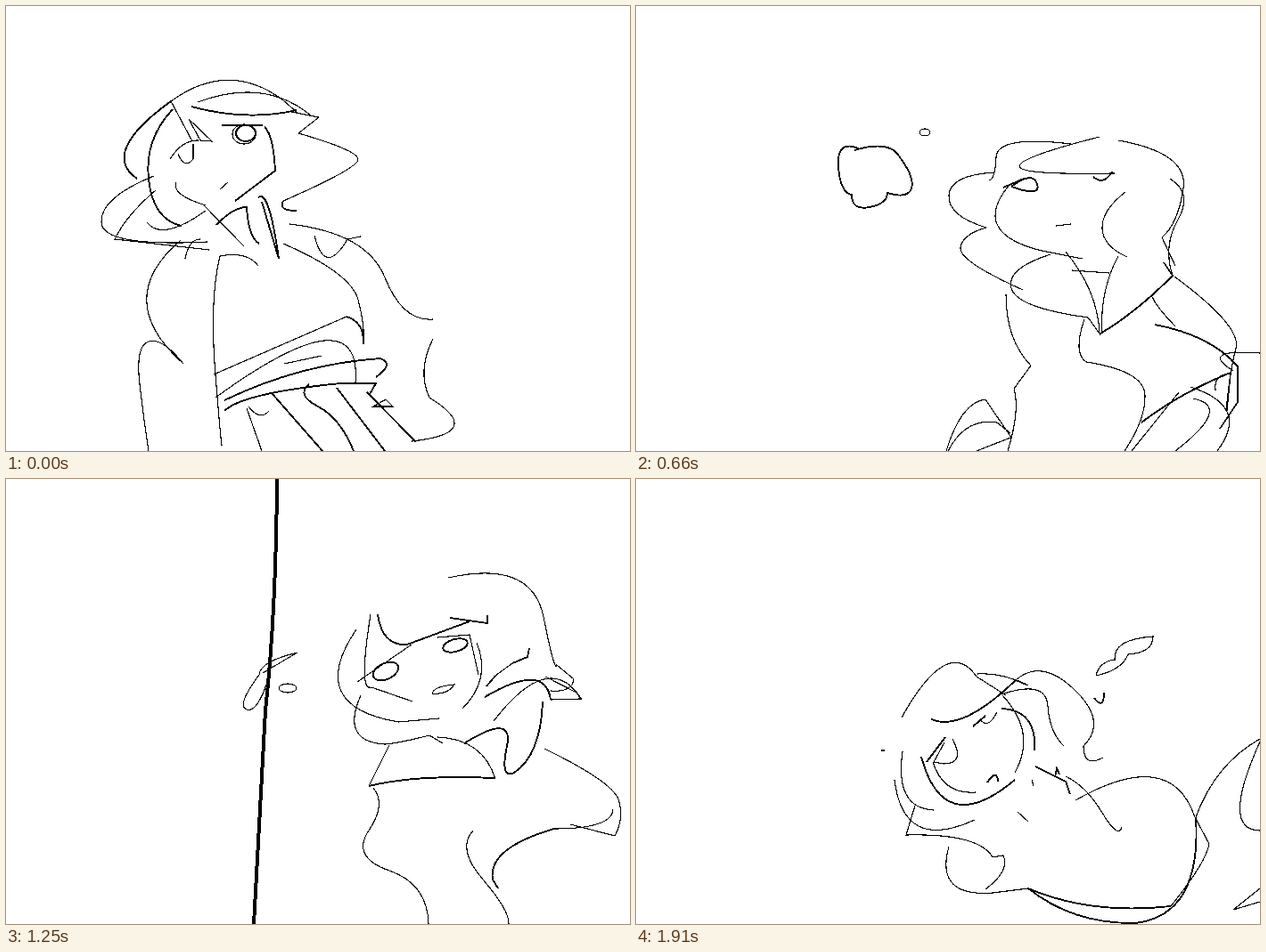
Recreate the animation shown at these times as an HTML page without scripts. Size 700 by 500 pixels, loop 2 s.

```html
<!DOCTYPE html>
<html lang="en">
<head>
<meta charset="utf-8">
<title>Sketch turn</title>
<style>
html, body { margin: 0; width: 100%; height: 100%; overflow: hidden; background: #fff; }
svg { display: block; width: 700px; height: 500px; fill: none; stroke: #000; stroke-width: 1.15; shape-rendering: crispEdges; }
.b { stroke-width: 1.9; }
.pole { stroke-width: 4; }
.pose, .pole { opacity: 0; animation: 2s step-end infinite; }
#up { animation-name: up; }
#wind { animation-name: wind; }
#turn { animation-name: turn; }
#stare { animation-name: stare; }
#flinch { animation-name: flinch; }
#lean { animation-name: lean; }
#fall { animation-name: fall; }
.pole { animation-name: pole; }
@keyframes up {
  0% { opacity: 1; translate: 0; }
  4% { translate: 2px 4px; }
  8% { opacity: 0; }
}
@keyframes wind {
  8% { opacity: 1; translate: -3px 4px; }
  12.5% { translate: 0; }
  16.5% { translate: 45px 8px; }
  20.5% { opacity: 0; }
}
@keyframes turn {
  20.5% { opacity: 1; translate: -60px; }
  25% { translate: 0; }
  29% { translate: 28px 4px; }
  33% { opacity: 0; }
}
@keyframes stare {
  33% { opacity: 1; translate: -20px; }
  37.5% { translate: 0; }
  41.5% { translate: -3px 2px; }
  45.5% { translate: -8px 1px; }
  50% { opacity: 0; }
}
@keyframes flinch {
  50% { opacity: 1; translate: 18px 2px; }
  54% { translate: 12px 1px; }
  58% { translate: 6px; }
  62.5% { translate: 0; }
  66.5% { translate: -8px 3px; }
  70.5% { opacity: 0; }
}
@keyframes pole {
  62.5% { opacity: 1; }
  70.5% { opacity: 0; }
}
@keyframes lean {
  70.5% { opacity: 1; translate: 12px -6px; }
  75% { translate: 0; }
  79% { translate: -10px 9px; }
  83% { translate: -22px 24px; }
  87.5% { opacity: 0; }
}
@keyframes fall {
  87.5% { opacity: 1; translate: 24px -28px; }
  91.5% { translate: 10px -12px; }
  95.5% { translate: 0; }
}
</style>
</head>
<body>
<svg viewBox="0 0 700 500">

<g class="pose" id="up">
  <!-- hair -->
  <path d="M185 107Q250 60 311 106L327 120M215 108Q290 80 342 123"/>
  <path d="M320 119L351 125 328 143Q394 162 395 172T311 219"/>
  <path d="M166 191Q106 215 107 243T226 265M168 207Q135 235 122 262L228 274"/>
  <path class="b" d="M208 113Q270 130 326 117M147 194Q105 165 185 107M311 219Q305 230 326 230"/>
  <!-- face -->
  <path class="b" d="M187 116Q155 150 160 195T197 247M290 136Q300 145 302 185L257 219"/>
  <path d="M158 243Q175 265 224 230M185 107L209 152M205 127L231 152 218 151Z"/>
  <path d="M184 172Q198 150 216 151M193 166Q200 184 210 172V155M242 134H288"/>
  <path d="M191 198Q185 212 224 224M240 206L249 198"/>
  <ellipse cx="267" cy="144" rx="13" ry="11"/>
  <ellipse class="b" cx="269" cy="143" rx="11" ry="9"/>
  <!-- torso -->
  <path class="b" d="M236 246Q255 226 270 226 272 260 284 267M283 215Q295 205 306 284L287 220"/>
  <path d="M222 224L267 270M196 263Q118 330 199 402M201 284Q205 262 218 262"/>
  <path d="M199 402Q175 372 160 377T150 425 160 500M283 292Q270 275 240 281 228 330 235 415T242 493"/>
  <path d="M318 245Q405 255 425 305T479 352M346 258Q358 305 383 262L398 259M479 374Q461 410 475 440 540 480 455 489"/>
  <path d="M311 267Q387 300 395 330T401 380M233 414L382 349M235 440Q400 320 392 424M312 402L354 393"/>
  <path class="b" d="M382 349Q402 355 401 380M245 443Q330 402 420 396 436 402 415 417"/>
  <path class="b" d="M245 455Q265 435 375 424L415 424 408 436"/>
  <!-- skirt -->
  <path d="M270 452L287 500M272 450Q285 467 295 455M412 450l14 -8 8 8z"/>
  <path class="b" d="M299 436L355 500M340 425Q325 437 350 450T390 500M371 429L425 500M405 434L460 490"/>
</g>

<g class="pose" id="wind">
  <path d="M233 112Q232 66 245 66T238 78M248 85Q287 40 291 85T312 96M322 141Q350 125 349 145T336 180"/>
  <path class="b" d="M312 96L317 140Q390 190 298 241M238 106Q230 80 157 140"/>
  <path d="M157 140Q130 165 116 200T157 236M233 112Q172 135 196 178M163 152Q155 215 210 194L192 218"/>
  <path class="b" d="M163 150L192 179M160 216Q188 190 193 236"/>
  <path d="M235 134L278 136M285 141Q322 185 262 232"/>
  <ellipse cx="198" cy="176" rx="11" ry="7"/>
  <ellipse cx="237" cy="219" rx="6" ry="3"/>
  <ellipse class="b" cx="268" cy="151" rx="12" ry="9" transform="rotate(35 268 151)"/>
  <!-- scarf -->
  <path class="b" d="M193 234Q123 235 126 250L118 277Q126 282 138 270T172 262M200 237Q265 195 294 277L262 232"/>
  <path class="b" d="M294 278Q370 235 379 212M294 278L273 293"/>
  <path d="M163 264L230 268Q242 283 292 283M268 242Q310 215 294 278M379 212Q370 203 333 204L298 241M273 293H298"/>
  <!-- body -->
  <path d="M178 283Q145 350 151 400T146 500M252 299Q255 330 225 375T240 441"/>
  <path class="b" d="M361 235Q395 225 388 280T379 355Q405 385 403 390L397 410M397 398Q445 395 462 500"/>
  <path class="b" d="M238 441Q205 375 265 380 360 376 385 386L427 404M240 444Q270 405 386 389"/>
  <path d="M262 440Q340 400 392 412M247 441Q280 475 254 500M284 440Q285 460 264 500M308 421Q315 455 291 500"/>
  <path class="b" d="M337 412Q360 425 303 500M358 412Q380 440 332 500M372 411Q395 435 352 500M385 411Q405 430 377 500"/>
</g>

<g class="pose" id="turn">
  <path class="b" d="M413 109Q380 92 257 129M310 153Q275 135 210 187M348 140L441 120M451 144L340 160 433 190 361 177"/>
  <path d="M257 129Q275 134 310 134T291 155M210 187Q208 197 286 217L266 235 298 243"/>
  <path d="M251 186L236 246Q310 242 354 264M361 177Q372 195 405 184M388 160Q405 190 486 153"/>
  <!-- face -->
  <path d="M358 187Q320 185 320 220T510 256M505 157Q512 145 513 165T475 244M406 240L424 243"/>
  <path class="b" d="M442 257L510 256Q524 250 516 167"/>
  <path stroke-width="5" d="M478 198L490 201"/>
  <!-- neck and torso -->
  <path class="b" d="M339 251Q400 270 448 314L484 317M417 307Q404 318 398 290T380 264"/>
  <path d="M465 262Q502 285 484 317M422 272Q450 263 453 290M453 317Q432 315 439 332"/>
  <path d="M380 264Q275 315 265 342T290 388L253 425Q275 440 300 434M358 277Q200 375 290 390"/>
  <path d="M298 264Q225 275 229 300T238 350 225 385 203 430 165 500"/>
  <path d="M498 271Q490 300 475 334L459 360 477 405Q472 450 462 448 420 447 355 430T270 440 218 500"/>
  <path d="M505 290Q512 325 478 370 475 400 481 452"/>
  <!-- skirt -->
  <path d="M328 432Q265 450 264 465T262 500M347 437Q275 465 295 472T280 500M370 444Q310 465 326 472T335 500"/>
  <path d="M410 444Q345 465 358 474T365 500M438 447Q405 465 425 475T432 500M490 475L500 500"/>
</g>

<g class="pose" id="stare">
  <path class="b" d="M270 160Q245 150 247 180T262 212Q262 230 282 226T302 210Q325 217 329 205T316 170Q305 150 265 162"/>
  <ellipse cx="344" cy="142" rx="6" ry="4"/>
  <!-- hair -->
  <path d="M540 147Q450 170 450 180T557 188M508 155Q425 145 424 170T416 196"/>
  <path d="M422 187Q372 190 371 213T413 249Q385 257 384 272T454 319"/>
  <path d="M561 151Q640 165 634 205T610 260L625 292M619 194Q645 210 628 240T622 303"/>
  <!-- face -->
  <path class="b" d="M441 203Q465 185 470 200T441 203M432 204L455 194M533 192Q545 202 554 186"/>
  <path d="M438 202Q395 255 475 275L521 284M569 209Q542 230 543 250T571 282M491 247L508 245"/>
  <path d="M485 279Q435 295 441 317T527 350L540 368Q538 320 502 276M509 297L551 300M561 281Q540 320 543 368"/>
  <path class="b" d="M541 368Q580 345 622 303L612 288"/>
  <!-- body and cape -->
  <path d="M435 324Q435 375 463 404L444 430Q451 455 437 500M523 352Q510 390 525 400 590 410 591 437T568 500"/>
  <path d="M624 304Q700 360 693 385T682 455M598 325Q605 340 625 360"/>
  <path class="b" d="M602 358Q665 370 695 405V445L675 475M587 468Q630 435 687 412"/>
  <path d="M670 432Q668 412 687 414L683 455M720 390Q650 385 690 410M576 500L629 434"/>
  <path d="M642 428Q710 450 672 500M645 441Q690 450 625 500"/>
  <path d="M368 500Q385 445 412 442L441 485M370 500Q390 462 425 468L440 480M402 500L440 485"/>
</g>

<path class="pole" d="M304 0Q303 150 291 260L278 500"/>
<g class="pose" id="flinch">
  <path d="M327 195Q285 205 284 220 258 255 270 259T294 225M288 218L325 196"/>
  <ellipse cx="316" cy="235" rx="10" ry="5"/>
  <!-- hair -->
  <path d="M496 111Q590 90 603 155T618 209L637 225Q635 240 611 238"/>
  <path d="M393 169Q335 255 440 273L486 269M409 152Q395 240 410 234L456 250"/>
  <path class="b" d="M417 152Q422 188 450 186L520 160M498 156L540 162V153"/>
  <!-- face -->
  <ellipse class="b" cx="426" cy="216" rx="15" ry="9" transform="rotate(-25 426 216)"/>
  <ellipse class="b" cx="504" cy="187" rx="14" ry="7" transform="rotate(-15 504 187)"/>
  <path d="M394 228L455 186M484 178L520 175 530 220M528 184Q545 225 512 258M478 241Q480 233 503 231 495 243 478 241"/>
  <path class="b" d="M539 233L549 221M568 207L585 200 587 190M537 245Q605 205 611 248"/>
  <path d="M549 221L568 207M611 248L645 247 640 240 605 222M547 272Q610 190 646 248"/>
  <!-- bandana and body -->
  <path d="M398 243Q375 295 425 298 440 297 475 288L490 297M430 299L407 345M484 290Q535 292 549 337"/>
  <path class="b" d="M407 345Q460 332 548 336M514 297Q570 262 562 300T570 330Q600 310 602 250"/>
  <path d="M412 347Q427 365 407 395T430 440 474 500M604 303Q680 340 687 360T683 401L633 388"/>
  <path d="M681 371Q680 393 615 393M524 395Q505 415 535 450T564 500"/>
  <path class="b" d="M615 393Q540 415 546 450L552 460"/>
</g>

<g class="pose" id="lean">
  <path d="M124 411Q150 370 236 291M170 376L191 359M270 293L285 272M190 440h5"/>
  <path class="b" d="M180 345L236 291M285 272L320 236"/>
  <!-- hair -->
  <path d="M456 143Q375 130 366 205L373 238M457 139Q520 135 555 178T619 180"/>
  <path d="M549 181Q575 175 592 145T643 150Q640 170 628 185 655 215 618 238"/>
  <path d="M444 145Q412 152 412 162 420 170 475 166 487 172 482 196"/>
  <!-- face -->
  <path class="b" d="M375 191Q420 222 478 184M366 210Q345 275 400 283T462 277M362 294Q405 302 461 277M494 181Q540 245 488 282"/>
  <path d="M457 190Q462 208 482 196M435 193L472 183M376 236Q385 222 402 214M365 212Q358 270 378 270L394 265"/>
  <path d="M433 270L486 251M515 225Q525 215 537 231M348 248Q335 285 362 294"/>
  <circle cx="396" cy="224" r="9"/>
  <circle cx="362" cy="266" r="9"/>
  <!-- scarf and body -->
  <path class="b" d="M489 281Q520 250 538 262V287L492 283M505 267L536 262M500 277L538 280"/>
  <path d="M516 258Q565 230 590 260T569 328M414 305Q370 330 386 352 420 362 498 335M505 342H515"/>
  <path d="M414 329Q420 300 530 290 558 290 528 338M395 356Q390 430 430 438 485 437 487 458T495 508"/>
  <path class="b" d="M578 307Q685 290 698 390M487 405Q575 408 598 508"/>
</g>

<g class="pose" id="fall">
  <!-- hair -->
  <path d="M298 268Q350 175 382 222L415 243M420 232Q450 198 490 235T502 300Q502 325 524 313"/>
  <path d="M383 219Q410 217 440 232M410 242Q460 225 462 255T480 300M411 243Q450 285 425 330"/>
  <path class="b" d="M331 270Q365 285 426 226L438 231M410 258Q450 260 447 305"/>
  <!-- face -->
  <path class="b" d="M326 318L347 290M378 278L392 266M320 312Q345 405 425 338M394 341Q405 325 406 340"/>
  <path d="M355 292Q370 320 345 320L334 318 346 296M386 270Q395 282 405 262M333 318Q345 355 381 352"/>
  <path d="M299 306Q290 370 334 372M290 338Q300 420 380 383M275 305h4M444 338l2 7M428 374l12 11"/>
  <!-- body -->
  <path d="M313 367L303 400Q385 398 400 425L412 423Q420 440 392 461M351 413Q335 470 400 465L440 460"/>
  <path class="b" d="M448 323L482 340 487 354M470 335L472 325 475 332"/>
  <path d="M482 334Q505 345 523 375T545 391M493 361Q600 300 627 380L643 410Q640 430 600 480"/>
  <path class="b" d="M600 480Q510 490 440 460 490 500 560 499 635 490 628 380"/>
  <path d="M628 380Q650 320 700 292M700 295Q655 395 700 395M700 460L670 484 700 475"/>
  <path d="M516 221Q520 205 537 203 535 180 580 177 580 195 552 197 545 215 516 221"/>
  <path class="b" d="M514 246Q525 260 525 240"/>
</g>
</svg>
</body>
</html>
```
